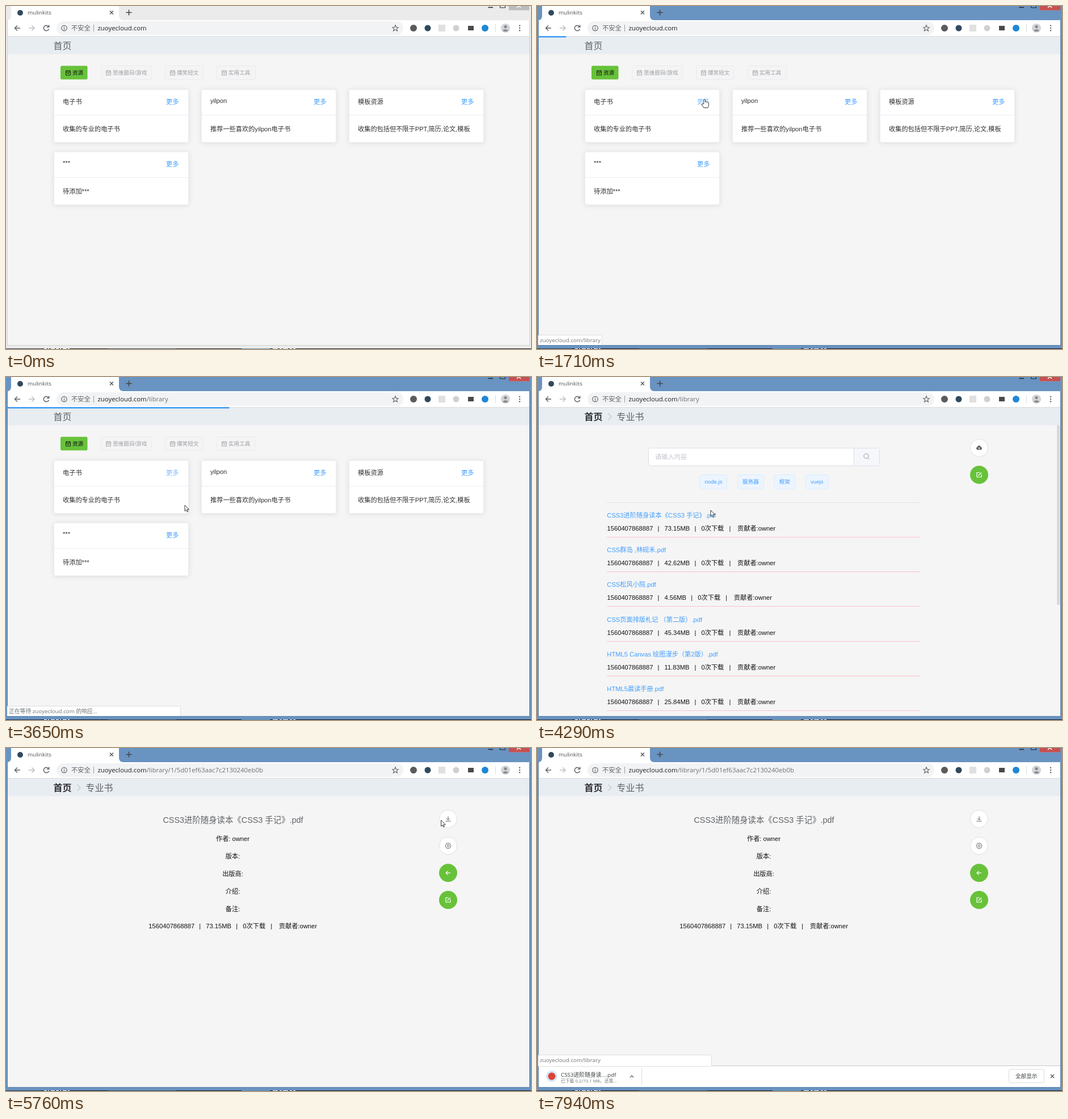
Write an HTML page that moves like this. It is 925 px wide and 605 px high and loops after 8100 ms.

```html
<!DOCTYPE html>
<html lang="zh-CN">
<head>
<meta charset="utf-8">
<title>mulinkits</title>
<style>
html, body { margin: 0; width: 100%; height: 100%; overflow: hidden; }
svg { display: block; width: 100%; height: 100%; font-weight: 300; }
text { font-family: "Liberation Sans", "Noto Sans CJK SC", "Noto Sans CJK", sans-serif; }
text.ui { font-family: "Open Sans", "Noto Sans CJK SC", "Noto Sans CJK", sans-serif; font-weight: 400; }
.card { filter: drop-shadow(0 1.6px 4.5px rgba(0,0,0,.1)); }
</style>
</head>
<body>
<svg id="stage" viewBox="0 0 925 605" preserveAspectRatio="none"></svg>
<script>
const LOOP = 8100;
const BLUE = '#409eff', GREEN = '#67c23a', INK = '#303133', GREY = '#606266';
const HOST = 'zuoyecloud.com', LIB = '/library', BOOK = '/library/1/5d01ef63aac7c2130240eb0b';

// Drawing helpers
const rect = (x, y, w, h, fill, more = '') =>
  `<rect x="${x}" y="${y}" width="${w}" height="${h}" fill="${fill}" ${more}/>`;
const circle = (x, y, r, fill, more = '') =>
  `<circle cx="${x}" cy="${y}" r="${r}" fill="${fill}" ${more}/>`;
const line = (d, color, w = 1, more = '') =>
  `<path d="${d}" fill="none" stroke="${color}" stroke-width="${w}" ${more}/>`;
const text = (x, y, s, size = 11.2, color = INK, more = '') =>
  `<text x="${x}" y="${y}" font-size="${size}" fill="${color}" ${more}>${s}</text>`;
const ui = (x, y, s, size, color, more = '') => text(x, y, s, size, color, 'class="ui" ' + more);
const mid = (x, y, s, size, color) => text(x, y, s, size, color, 'text-anchor="middle"');
const group = (id, body, more = '') => `<g id="${id}" ${more}>${body}</g>`;
const at = (x, y, body) => `<g transform="translate(${x} ${y})">${body}</g>`;

// Icons, centred on 0,0
const icons = {
  calendar: c => line('M-4 -3.5H4V4H-4ZM-4 -1H4M-2 -5V-2.5M2 -5V-2.5M-2 1.2H2', c, .9),
  edit: c => line('M1 -4H-4V4H4V-1M-1.5 1.5L4 -4', c, 1.2),
  back: c => line('M4 0H-4M-.5 -3.5L-4 0L-.5 3.5', c, 1.2),
  download: c => line('M-4.5 4H4.5M0 -4.5V2M-2.7 -.6L0 2L2.7 -.6', c),
  gear: c => line('M-2.5 -4.5H2.5L5 0L2.5 4.5H-2.5L-5 0Z', c) + circle(0, 0, 1.9, 'none', `stroke="${c}"`),
  cloud: c => `<path d="M-3 3.5A2.6 2.6 0 0 1 -3.3 -1.5A3.4 3.4 0 0 1 3.2 -1.5A2.6 2.6 0 0 1 3 3.5Z" fill="${c}"/>`
    + line('M0 3V-.5M-1.5 1L0 -.5L1.5 1', '#fff', .9),
  cross: c => line('M-3 -3L3 3M3 -3L-3 3', c, 1.3)
};
const roundButton = (y, icon, green) => at(779, y,
  circle(0, 0, green ? 16 : 15.5, green ? GREEN : '#fff', green ? '' : 'stroke="#dcdfe6"')
  + icons[icon](green ? '#fff' : GREY));

function browserFrame() {
  const dark = '#5f6368';
  const toolbar = line('M25 39H16M20 34.5L15.5 39L20 43.5', dark, 1.5)
    + line('M40 39H50M45.5 34.5L50 39L45.5 43.5', '#bdc1c6', 1.5)
    + line('M74.6 36A4.7 4.7 0 1 0 75.5 40.5M75.7 33.5V37.3H71.8', dark, 1.5)
    + rect(89, 27, 611, 24, '#f1f3f4', 'rx="12"')
    + circle(102.5, 39, 4.7, 'none', `stroke="${dark}" stroke-width="1.2"`)
    + line('M102.5 36.3V37.6M102.5 38.6V41.8', dark, 1.2)
    + ui(115, 43, '不安全', 11.3, dark) + line('M154.5 33V45', '#9aa0a6')
    + ui(161.5, 43, `${HOST}<tspan id="path" fill="#6f7377"></tspan>`, 11.4, '#202124')
    + line('M686 33.8L687.5 37.5L691.3 37.7L688.3 40.2L689.4 44L686 41.8L682.6 44L683.7 40.2L680.7 37.7L684.5 37.5Z', dark, 1.1)
    + circle(718, 39, 6, '#5b5b5b') + circle(743, 39, 5.5, '#2f495e')
    + rect(762, 33, 12, 12, '#e0e0e0') + circle(793, 39, 5.5, '#d0d0d0')
    + rect(814, 35, 10, 8, '#4a4a4a') + circle(844, 39, 6, '#1f87d6')
    + line('M862.5 32V46', '#dadce0')
    + circle(880, 39, 8, '#d2d4d7') + circle(880, 36.5, 2.6, '#85898e')
    + `<path d="M875 43.5Q880 38.5 885 43.5Q880 46.5 875 43.5Z" fill="#85898e"/>`
    + [34.7, 39, 43.3].map(y => circle(905, y, 1.2, dark)).join('');
  return rect(0, 0, 925, 605, '#ebebeb') + rect(0, 0, 925, 605, '#6993c1', 'id="active"')
    + line('M2.5 25V598.5H922.5V25', '#000', 1, 'opacity=".1"')
    + rect(0, 604, 925, 1, '#14171a') + rect(0, 604, 62, 1, '#27364a')
    + line('M67 604.5H112', '#eee', 1, 'stroke-dasharray="5 2 2 3 7 2"')
    + rect(180, 604, 120, 1, '#384653') + rect(415, 604, 50, 1, '#5e93a8')
    + line('M470 604.5H510', '#ddd', 1, 'stroke-dasharray="9 3 4 2"')
    + rect(886, 0, 36, 7.5, '#bcbcbc') + rect(886, 0, 36, 7.5, '#c75050', 'id="close"')
    + line('M900 -4L907 3M907 -4L900 3', '#fff', 1.5)
    + line('M849.5 2.5H858', '#222', 1.5) + line('M870.5 -2V3H879.5V-2', '#222')
    + `<path d="M3 25Q9 24 9 17V0H199V17Q199 24 206 25H922V53H3Z" fill="#fff"/>`
    + circle(25, 12, 5, '#2f495e') + ui(38, 15.3, 'mulinkits', 9.8, '#4c5054')
    + at(186, 11.5, icons.cross('#4c5054')) + line('M211.5 11.5H221.5M216.5 6.5V16.5', '#444', 1.5)
    + toolbar;
}

const moreLink = (x, y, id = '') => text(x, y, '更多', 11.2, BLUE, id && `id="${id}"`);

function homePage() {
  const label = (x, s, color, weight) => at(x + 13.5, 118, icons.calendar(color))
    + text(x + 21, 121.3, s, 9.6, color, `font-weight="${weight}"`);
  const tab = (x, w, s) => rect(x + .5, 105.5, w - 1, 24, '#f4f4f5', 'rx="2.5" stroke="#e9eaec"') + label(x, s, '#9d9fa3', 400);
  const card = (x, y, title, body, id) =>
    rect(x + .5, y + .5, 237, 93, '#fff', 'rx="3" stroke="#ebeef5" class="card"')
    + line(`M${x + 1} ${y + 45.5}h236`, '#ebeef5')
    + text(x + 16, y + (/[a-z*]/.test(title) ? 24 : 26), title)
    + moreLink(x + 198, y + 26, id) + text(x + 16, y + 74, body);
  return text(83.5, 75.6, '首页', 16, GREY)
    + rect(96, 105.5, 47.5, 24, GREEN, 'rx="2.5"') + label(96, '资源', '#111', 500)
    + tab(167, 90, '思维题目/游戏') + tab(280, 68, '爆笑短文') + tab(371, 69, '实用工具')
    + card(84, 147, '电子书', '收集的专业的电子书', 'more')
    + card(344, 147, 'yilpon', '推荐一些喜欢的yilpon电子书')
    + card(604, 147, '模板资源', '收集的包括但不限于PPT,简历,论文,模板')
    + card(84, 257, '***', '待添加***');
}

const breadcrumb = text(83.5, 75.6, '首页', 16, INK, 'font-weight="700"')
  + line('M125.5 64.5L131 70L125.5 75.5', '#c0c4cc', 1.2) + text(140.5, 75.6, '专业书', 16, GREY);

function meta(x, y, size) {
  const shift = size.length < 7 ? -6.2 : 0;
  const parts = [[0, '1560407868887'], [89, '|'], [101, size], [154 + shift, '|'],
    [166 + shift, '0次下载'], [215 + shift, '|'], [229.5 + shift, '贡献者:owner']];
  return parts.map(([dx, s]) => text(x + dx, y, s, 11.2, '#111')).join('');
}

const books = [
  ['CSS3进阶随身读本《CSS3 手记》.pdf', '73.15MB'],
  ['CSS群岛 ,林砚禾.pdf', '42.62MB'],
  ['CSS松风小院.pdf', '4.56MB'],
  ['CSS页面排版札记 （第二版）.pdf', '45.34MB'],
  ['HTML5 Canvas 绘图漫步（第2版）.pdf', '11.83MB'],
  ['HTML5晨读手册.pdf', '25.84MB']
];

function listPage() {
  const tag = (x, w, s) => rect(x + .5, 172.5, w, 24.5, '#ecf5ff', 'rx="3" stroke="#d9ecff"') + mid(x + w / 2 + .5, 188.3, s, 9.6, BLUE);
  return breadcrumb
    + rect(196.5, 125.5, 407, 31, '#fff', 'rx="3" stroke="#dcdfe6"')
    + rect(558.5, 126, 44.5, 30, '#f5f7fa') + line('M558.5 126V156', '#dcdfe6')
    + text(208, 145, '请输入内容', 11.2, '#c0c4cc')
    + circle(580, 139.5, 4.2, 'none', 'stroke="#909399"') + line('M583 142.5L585.8 145.3', '#909399')
    + tag(287, 47, 'node.js') + tag(353, 46, '服务器') + tag(417.5, 36.5, '框架') + tag(473, 39.5, 'vuejs')
    + line('M123 221.5H676', '#dcdfe6')
    + books.map(([title, size], i) => {
      const y = i * 61.2;
      return text(123.3, y + 248, title, 11.2, BLUE) + meta(123.5, y + 271, size)
        + line(`M123 ${Math.round(y + 282) + .5}H676`, '#ffc0cb');
    }).join('')
    + roundButton(125, 'cloud') + roundButton(172.5, 'edit', true)
    + rect(916, 85, 5.5, 317, '#d9d9d9', 'rx="2"');
}

function detailPage() {
  const labels = ['作者: owner', '版本:', '出版商:', '介绍:', '备注:'];
  return breadcrumb + mid(400, 132, books[0][0], 14.4, GREY)
    + labels.map((s, i) => mid(399.5, 163.5 + 31 * i, s, 11.2, '#111')).join('')
    + meta(251.3, 318.3, books[0][1])
    + roundButton(125, 'download') + roundButton(172.5, 'gear')
    + roundButton(220.3, 'back', true) + roundButton(268, 'edit', true)
    + group('hover', at(779, 125, circle(0, 0, 15.5, '#ecf5ff', `stroke="${BLUE}"`) + icons.download(BLUE)))
    + group('tip', rect(804, 111, 35, 27, INK, 'rx="3"')
      + `<path d="M799 124.5L804 119.5V129.5Z" fill="${INK}"/>` + text(812, 128, '下载', 9.6, '#fff'));
}

const shelf = rect(3, 560, 919, 38, '#fff') + line('M3 560.5H922', '#c9c9c9')
  + circle(26, 579, 10, '#d5e5fb') + circle(26, 579, 6.5, '#db4437')
  + ui(42, 580, 'CSS3进阶随身读....pdf', 9.8, '#3c4043')
  + ui(42, 590, '已下载 <tspan id="amount"></tspan>/73.1 MB，还需...', 7.8, '#6f7377')
  + line('M164 581L167 578L170 581', '#5f6368', 1.3) + line('M184.5 565V594', '#dadce0')
  + rect(831.5, 566.5, 62, 24, '#fff', 'rx="2.5" stroke="#dadce0"') + ui(843, 582.3, '全部显示', 9.6, '#3c4043')
  + at(908, 579, icons.cross('#4c5054'));

const arrow = '<path d="M0 0V10.6L2.5 8.3L4.1 12L5.8 11.2L4.2 7.7H7.6Z" fill="#fff" stroke="#222" stroke-width=".9"/>';
const hand = '<path d="M-1.3 9V1Q0 -1 1.3 1V5.2Q3 4.4 3.8 5.8Q5.3 5.2 6 6.6Q7.6 6.4 7.6 8.2V11Q7.4 13 6 15.5H-1.2Q-2.5 13 -4.8 10Q-5 8 -3 8.4Z" fill="#fff" stroke="#222" stroke-width=".9"/>';

const stage = document.getElementById('stage');
stage.innerHTML = '<clipPath id="view"><rect x="2" y="53" width="920" height="545"/></clipPath>'
  + browserFrame()
  + `<g clip-path="url(#view)">${rect(3, 53, 919, 545, '#f5f5f5') + rect(3, 54, 919, 31, '#e8edf2') + line('M3 53.5H922', '#dadada')
    + group('home', homePage()) + group('list', listPage()) + group('detail', detailPage())
    + rect(3, 53, 0, 2.5, '#3b9bf5', 'id="bar"')
    + group('shelf', shelf)
    + group('status', rect(1.5, 580.5, 306, 20, '#fff', 'id="bubble" rx="2" stroke="#dedede"') + ui(5, 593, '', 9.8, '#6f7377', 'id="hint"'))}</g>`
  + circle(0, 0, 11, '#fbfb45', 'id="click"') + group('arrow', arrow) + group('hand', hand);

const el = {};
stage.querySelectorAll('[id]').forEach(node => el[node.id] = node);

// Timing helpers
const ramp = (t, a, b) => Math.min(1, Math.max(0, (t - a) / (b - a)));
const ease = p => p * p * (3 - 2 * p);
const during = (t, a, b) => t >= a && t < b;
const set = (node, attrs) => { for (const k in attrs) node.setAttribute(k, attrs[k]); };
const fade = (node, opacity) => set(node, { opacity, visibility: opacity > 0 ? 'visible' : 'hidden' });

const mousePath = [
  [150, 632, 584], [840, 295, 164], [2330, 295, 164], [2750, 323, 200], [3110, 315, 226], [3820, 315, 226],
  [4290, 306, 235], [4530, 294, 241], [5070, 294, 241], [5840, 781, 124], [6640, 781, 124], [7000, 162, 66]
];
function mouseAt(t) {
  const i = mousePath.findIndex(k => k[0] > t);
  if (i < 0) return mousePath[mousePath.length - 1].slice(1);
  if (!i) return mousePath[0].slice(1);
  const [t0, x0, y0] = mousePath[i - 1], [t1, x1, y1] = mousePath[i];
  const p = ease(ramp(t, t0, t1));
  return [x0 + (x1 - x0) * p, y0 + (y1 - y0) * p];
}

function hintAt(t) {
  if (during(t, 800, 2480)) return HOST + LIB;
  if (during(t, 2480, 3820)) return `正在等待 ${HOST} 的响应...`;
  if (during(t, 4680, 5320)) return HOST + BOOK;
  return t >= 6960 ? HOST + LIB : '';
}

function draw(t) {
  const active = ramp(t, 1010, 1240);
  fade(el.active, active);
  fade(el.close, active);
  el.path.textContent = t < 3190 ? '' : t < 5000 ? LIB : BOOK;

  fade(el.home, 1 - ramp(t, 3820, 4000));
  fade(el.list, t < 5000 ? ramp(t, 4000, 4230) : 0);
  fade(el.detail, t < 5000 ? 0 : 1);
  el.more.setAttribute('fill', during(t, 800, 3820) ? '#79bbff' : BLUE);

  const loading = during(t, 1460, 3820);
  set(el.bar, { width: loading ? .1763 * (t - 1437) : 919 });
  fade(el.bar, loading ? 1 : during(t, 3820, 4250) ? 1 - ramp(t, 4000, 4250)
    : during(t, 5000, 5500) ? 1 - ramp(t, 5200, 5500) : 0);

  const hint = hintAt(t), rise = ease(ramp(t, 6720, 6880));
  fade(el.status, hint ? 1 : 0);
  el.hint.textContent = hint;
  set(el.bubble, { width: t < 2480 ? 113 : 306 });
  set(el.status, { transform: `translate(0 ${-39 * rise})` });
  set(el.shelf, { transform: `translate(0 ${38 * (1 - rise)})` });
  fade(el.shelf, rise ? 1 : 0);
  el.amount.textContent = t < 7160 ? '0.1' : '0.2';

  const leave = 1 - ramp(t, 6680, 6850);
  fade(el.hover, ramp(t, 5800, 5960) * leave);
  fade(el.tip, ramp(t, 5930, 6330) * leave);

  const [x, y] = mouseAt(t);
  const shown = during(t, 150, 7790);
  const pointing = during(t, 800, 2420) || during(t, 4600, 5000) || during(t, 5800, 6680) || t > 6960;
  fade(el.arrow, shown && !pointing ? 1 : 0);
  fade(el.hand, shown && pointing ? 1 : 0);
  for (const node of [el.arrow, el.hand]) set(node, { transform: `translate(${x} ${y})` });
  set(el.click, { cx: x - 1, cy: y });
  fade(el.click, during(t, 1010, 1240) || during(t, 4910, 5000) || during(t, 6480, 6640) ? .75 : 0);
}

const start = performance.now();
function tick() {
  draw((performance.now() - start) % LOOP);
  requestAnimationFrame(tick);
}
tick();
</script>
</body>
</html>
```
